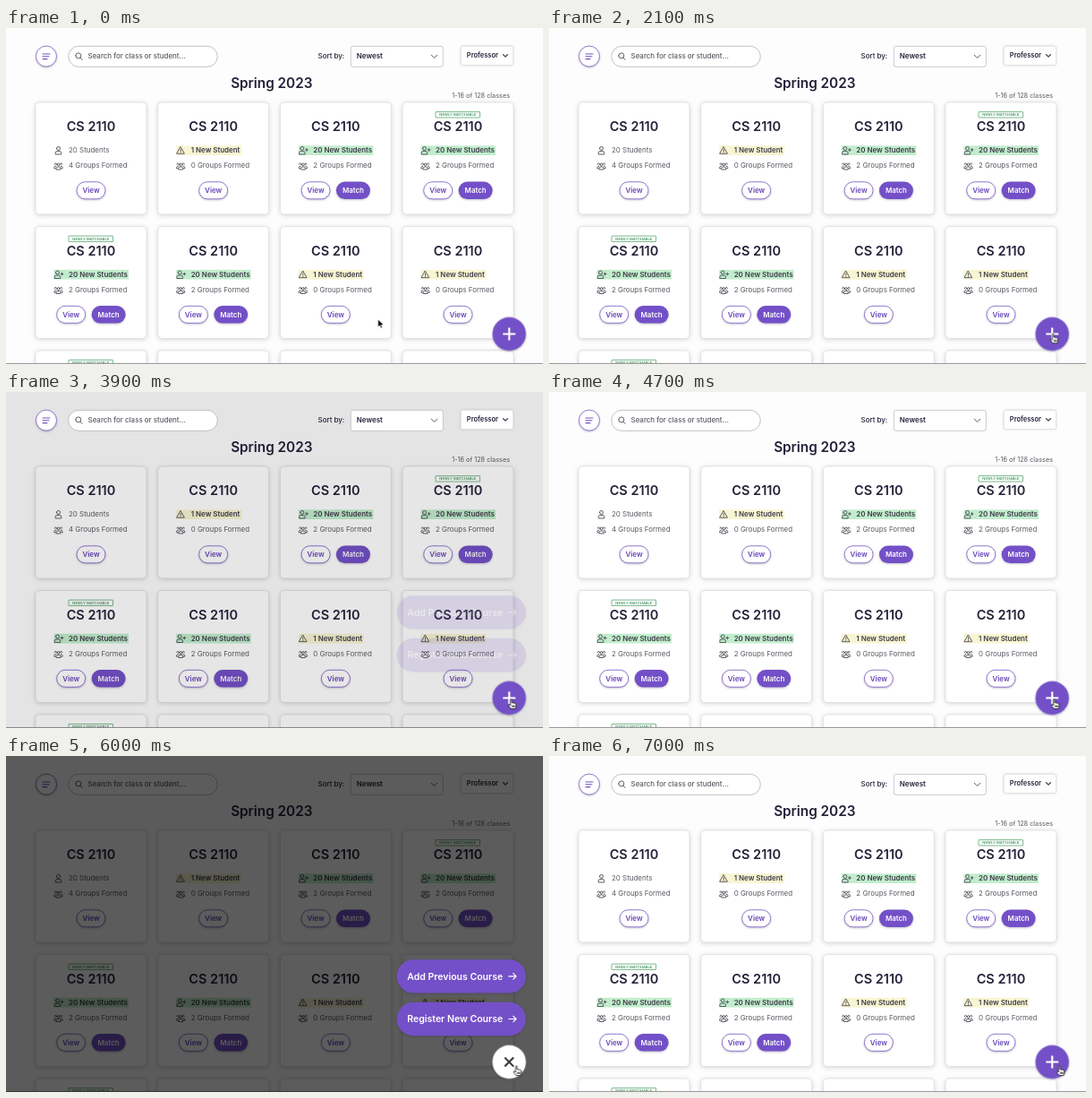
Write an HTML page that moves like this. It is 600 by 375 pixels and loops after 7.1 s.

```html
<!DOCTYPE html>
<html lang="en">
<head>
<meta charset="utf-8">
<title>Class dashboard</title>
<style>
  html, body { margin: 0; width: 100%; height: 100%; overflow: hidden; background: #fdfdfd; }
  svg { display: block; width: 600px; height: 375px; font-family: Inter, "Open Sans", sans-serif; }
  text { fill: #5b5963; font-size: 7.95px; font-weight: 400; }
  .mid { text-anchor: middle; }
  .bold { font-weight: 600; }
  .dark { fill: #25213a; }
  .noted { fill: #3d3a48; font-weight: 600; }
  .title { font-size: 14.5px; }
  .panel { fill: #fff; stroke: #dddce0; stroke-width: .8; }
  .card { filter: drop-shadow(0 1px 2.5px rgba(40, 35, 60, .18)); }
  .lift { filter: drop-shadow(.8px 1.2px 1.2px rgba(40, 35, 60, .28)); }
  .line { fill: none; stroke: #45434e; stroke-width: .85; stroke-linecap: round; stroke-linejoin: round; }
  .outline { fill: #fff; stroke: #7350c7; stroke-width: .75; }
  .solid { fill: #7350c7; }
  .accent { fill: #6644b8; }
  .light { fill: #fff; }
  .tag { fill: #fff; stroke: #3f9b5c; stroke-width: .7; }
  .tagText { fill: #2f8a4d; font-size: 4.1px; font-weight: 500; }
  .action { font-size: 10.5px; }

  .show, .dim, .disc, .icon, .cursor, .arrow, .hand { animation: 7100ms linear infinite; }
  .show { animation-name: show; }
  .dim { animation-name: dim; }
  .disc { animation-name: disc; }
  .icon { animation-name: turn; fill: none; stroke-width: 2.2; }
  .cursor { animation-name: travel; }
  .arrow { animation-name: arrow; }
  .hand { animation-name: hand; }

  @keyframes show {
    0%, 56.13%, 97.11%, 100% { opacity: 0; }
    31.69%, 70.55% { opacity: 0; animation-timing-function: cubic-bezier(.4, 0, .2, 1); }
    34.86%, 73.72% { opacity: 1; }
    53.38%, 94.37% { opacity: 1; animation-timing-function: cubic-bezier(.4, 0, .2, 1); }
  }
  /* The header controls and round button recover ahead of the page. */
  @keyframes dim {
    0%, 54.93%, 95.92%, 100% { filter: brightness(1); }
    31.69%, 70.55% { filter: brightness(1); animation-timing-function: cubic-bezier(.4, 0, .2, 1); }
    34.86%, 73.72% { filter: brightness(.36); }
    53.38%, 94.37% { filter: brightness(.36); animation-timing-function: cubic-bezier(.4, 0, .2, 1); }
  }
  @keyframes disc {
    0%, 54.93%, 95.92%, 100% { fill: #7350c7; }
    31.69%, 70.55% { fill: #7350c7; animation-timing-function: cubic-bezier(.4, 0, .2, 1); }
    34.86%, 73.72% { fill: #fff; }
    53.38%, 94.37% { fill: #fff; animation-timing-function: cubic-bezier(.4, 0, .2, 1); }
  }
  @keyframes turn {
    0%, 54.93%, 95.92%, 100% { transform: rotate(0deg); stroke: #fff; }
    31.69%, 70.55% { transform: rotate(0deg); stroke: #fff; animation-timing-function: cubic-bezier(.4, 0, .2, 1); }
    34.86%, 73.72% { transform: rotate(45deg); stroke: #3a383f; }
    53.38%, 94.37% { transform: rotate(45deg); stroke: #3a383f; animation-timing-function: cubic-bezier(.4, 0, .2, 1); }
  }
  @keyframes travel {
    0% { transform: translate(415.6px, 325px); }
    2.82% { transform: translate(415.6px, 325px); animation-timing-function: ease-in-out; }
    15.49%, 25% { transform: translate(562.8px, 340.3px); }
    31%, 45% { transform: translate(563.3px, 341.6px); }
    52%, 73.94% { transform: translate(564.4px, 343px); animation-timing-function: ease-in-out; }
    79.58%, 100% { transform: translate(570.3px, 346px); }
  }
  @keyframes arrow {
    0% { opacity: 1; animation-timing-function: step-end; }
    12.68%, 100% { opacity: 0; }
  }
  @keyframes hand {
    0% { opacity: 0; animation-timing-function: step-end; }
    12.68%, 100% { opacity: 1; }
  }
</style>
</head>
<body>
<svg id="stage" viewBox="0 0 600 375"></svg>
<script>
  const text = (x, y, cls, words, style = '') =>
    `<text x="${x}" y="${y}" class="${cls}" style="${style}">${words}</text>`;
  const box = (x, y, w, h, r, cls, style = '') =>
    `<rect x="${x}" y="${y}" width="${w}" height="${h}" rx="${r}" class="${cls}" style="${style}"/>`;
  const line = (d, style = '') => `<path class="line" d="${d}" style="${style}"/>`;
  const at = (x, y, body) => `<g transform="translate(${x} ${y})">${body}</g>`;

  // Icons are centred on 0,0.
  const person = line('M-2-2.2a2 2 0 1 1 4 0a2 2 0 1 1-4 0M-3.3 4v-1.2q0-1.8 1.8-1.8h3q1.8 0 1.8 1.8V4z');
  const icons = {
    person,
    added: at(-1, 0, person) + line('M2.6-.6h3M4.1-2.1v3'),
    warn: line('M0-3.8L4.2 3.6H-4.2zM0-1.2V1M0 2.3v.2'),
    group: line('M-1.4-1.3a1.4 1.4 0 1 1 2.8 0a1.4 1.4 0 1 1-2.8 0M-2.4 3.8V2.6q0-1.4 1.4-1.4h2q1.4 0 1.4 1.4v1.2z' +
      'M-4.2-1.7a1.1 1.1 0 1 1 1.6.9M2.6-.8a1.1 1.1 0 1 1 1.6-.9M-3 .5q-1.6 0-1.6 1.4V3h1.4M3 .5q1.6 0 1.6 1.4V3h-1.4')
  };

  const kinds = {
    plain: { icon: 'person', label: '20 Students', groups: 4 },
    warn: { icon: 'warn', label: '1 New Student', groups: 0, mark: '#f7f5d2', width: 73 },
    fresh: { icon: 'added', label: '20 New Students', groups: 2, mark: '#c2edcd', width: 83.5, match: true }
  };

  function card(name, col, row, tagged) {
    const k = kinds[name];
    const view = k.match ? 39.7 : 62;
    let s = box(0, 0, 124, 125, 4.5, 'panel card') + text(62, 32, 'mid bold dark title', 'CS 2110');
    if (tagged) s += box(37, 10.6, 49.5, 6.4, .4, 'tag') + text(61.8, 15.3, 'mid tagText', 'NEWLY MATCHABLE');
    if (k.mark) s += box(20.5, 48.3, k.width, 10.7, 0, '', 'fill:' + k.mark);
    s += at(25.5, 53.6, icons[k.icon]) + text(37, 56.4, k.mark ? 'noted' : '', k.label);
    s += at(25.5, 70.8, icons.group) + text(37, 73.4, '', k.groups + ' Groups Formed');
    s += box(view - 16, 88.8, 32, 19, 9.5, 'outline lift') + text(view, 101.1, 'mid bold accent', 'View');
    if (k.match) s += box(62.6, 88.6, 38, 19.4, 9.7, 'solid lift') + text(81.6, 101.1, 'mid bold light', 'Match');
    return at(33 + col * 136.67, 83 + row * 138.5, s);
  }

  const layout = [
    'plain', 'warn', 'fresh', 'fresh',
    'fresh', 'fresh', 'warn', 'warn',
    'fresh', 'plain', 'plain', 'plain'
  ];
  const tagged = [3, 4, 8];
  const cards = layout.map((name, i) => card(name, i % 4, Math.floor(i / 4), tagged.includes(i))).join('');

  const header =
    '<circle cx="45" cy="31.6" r="11.5" class="outline lift"/>' +
    line('M41 29h8M41 31.8h7M41 34.6h5', 'stroke:#7350c7;stroke-width:1.1') +
    box(69.7, 20.3, 166.6, 23, 11.5, 'panel', 'stroke:#b3b0bd') +
    line('M77.8 30.9a3 3 0 1 1 6 0a3 3 0 1 1-6 0M83 33.2l2.2 2.2') +
    text(91.5, 34.4, '', 'Search for class or student...', 'font-weight:500') +
    text(348.5, 34.4, 'dark', 'Sort by:', 'font-weight:500') +
    box(385.3, 20.3, 103, 23, 2.5, 'panel', 'stroke:#bdbbc4') +
    text(391.8, 34.4, 'bold dark', 'Newest') + line('M475.3 30.2l3.2 3.2 3.2-3.2') +
    box(508.2, 20.2, 58.4, 21.4, 2.5, 'panel', 'filter:drop-shadow(0 .5px .8px rgba(40,35,60,.18))') +
    text(514.8, 33.3, 'bold dark', 'Professor', 'font-size:7.5px') +
    line('M555.6 29.7l2.4 2.4 2.4-2.4', 'stroke-width:1.3');

  const action = (y, label) => box(436.6, y, 144.4, 37.4, 18.7, 'solid lift') +
    text(448.3, y + 22.4, 'bold light action', label) +
    line(`M561.8 ${y + 18.7}h8M566.8 ${y + 15.5}l3.2 3.2-3.2 3.2`, 'stroke:#fff;stroke-width:1.2');

  const cursor =
    '<path class="arrow" d="M0 0V9L2.1 7.1 3.5 10.2 5 9.5 3.6 6.5H6.4z" fill="#000" stroke="#fff" stroke-width=".7"/>' +
    '<path class="hand" d="M-.9.4Q0-.7.9.4V4Q2 3.3 2.7 4.3Q3.7 3.7 4.3 4.7Q5.6 4.4 5.6 5.8V7.6L4.8 10.6H-.3L-3 6.9' +
    'Q-3.2 5.4-1.9 5.8L-.9 6.8zM1.2 6.6v2.4M2.7 6.6v2.4M4 6.6v2.4" fill="#fff" stroke="#111" stroke-width=".8"/>';

  document.getElementById('stage').innerHTML =
    '<rect width="600" height="375" fill="#fdfdfd"/>' +
    text(296.8, 67.2, 'mid bold dark', 'Spring 2023', 'font-size:15.3px') +
    text(563, 78, '', '1-16 of 128 classes', 'font-size:7.3px;text-anchor:end') +
    cards +
    '<rect y="374" width="600" height="1" fill="#98979b"/>' +
    '<rect class="show" width="600" height="375" fill="#000" fill-opacity=".64"/>' +
    `<g class="dim">${header}</g>` +
    `<g class="show">${action(227.2, 'Add Previous Course')}${action(274.8, 'Register New Course')}</g>` +
    at(562.2, 341.5, '<circle r="18.7" class="disc lift"/><path class="icon" d="M-7 0H7M0-7V7"/>') +
    `<g class="cursor">${cursor}</g>`;
</script>
</body>
</html>
```
